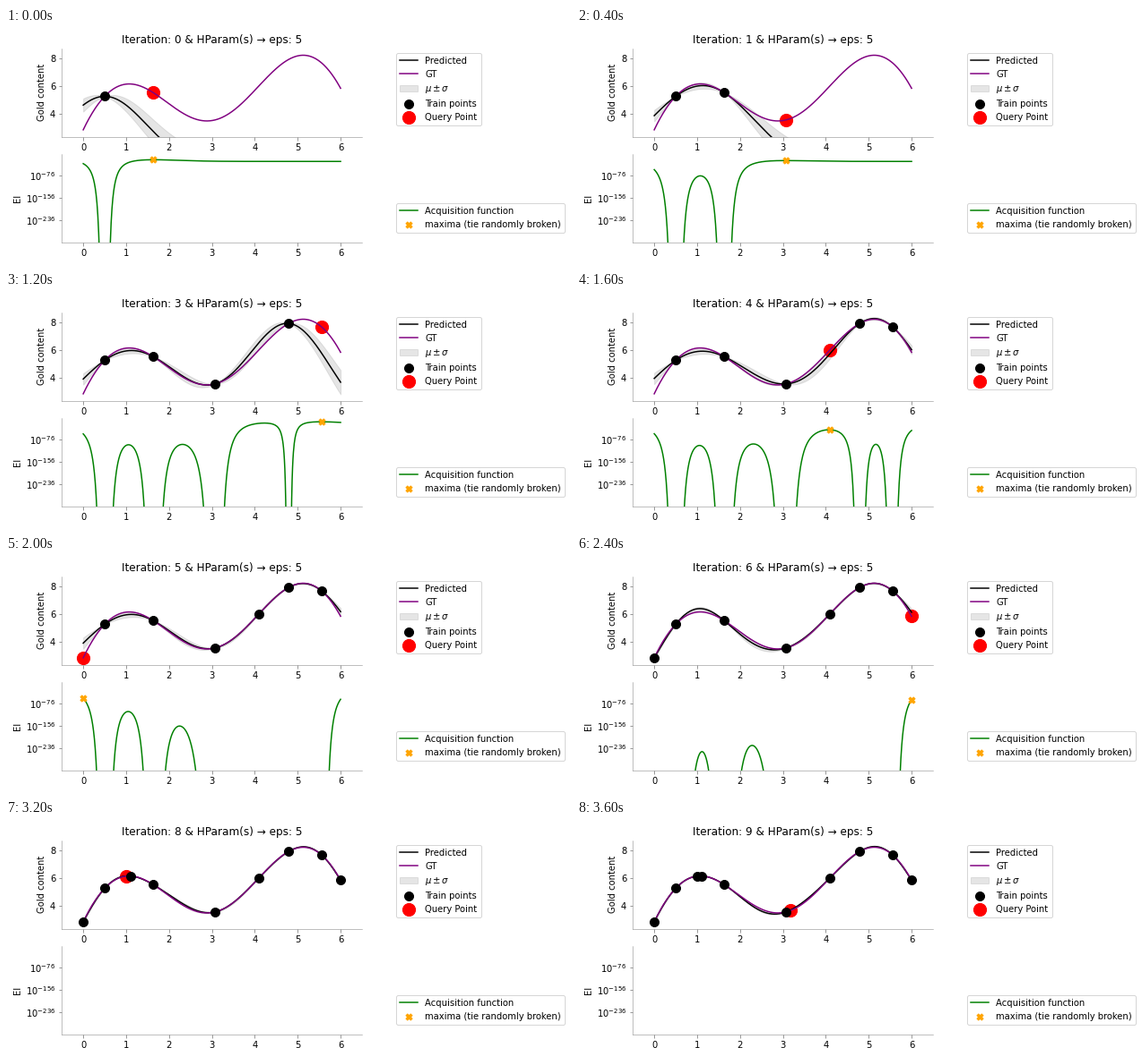
These frames come from a looping animation (630x264 px, 4 s). A matplotlib script:

```python
import numpy as np
import matplotlib.pyplot as plt
from matplotlib.animation import FuncAnimation

W, H, DPI = 630, 264, 72
EPS, SCALE = 5, 0.983
ITERS, STEP = 10, 400

plt.rcParams.update({"font.family": "DejaVu Sans", "font.size": 10})

# Smooth ground truth through a few known depths
KNOWN_X = [0, 0.5, 1.05, 1.64, 2.87, 3.08, 4.1, 4.79, 5.12, 5.55, 6]
KNOWN_Y = [2.82, 5.25, 6.15, 5.5, 3.46, 3.55, 6.01, 7.95, 8.21, 7.7, 5.83]
truth = np.poly1d(np.polyfit(KNOWN_X, KNOWN_Y, 8))

# First drill site, then the query chosen at each iteration
SITES = np.array([0.5, 1.635, 3.07, 4.79, 5.55, 4.1, 0, 6, 1.11, 1.01, 3.17])
xs = np.linspace(0, 6, 601)


def rbf(a, b):
    return np.exp(-0.5 * ((a[:, None] - b[None, :]) / SCALE) ** 2)


def posterior(x, train):
    k = rbf(train, x)
    w = np.linalg.solve(rbf(train, train) + 1e-10 * np.eye(len(train)), k)
    var = 1 - np.sum(k * w, axis=0)
    return w.T @ truth(train), np.sqrt(np.maximum(var, 1e-10))


def log_ei(mu, sd):
    """log10 of expected improvement, by its tail expansion."""
    z = (mu - truth(SITES[0]) - EPS) / sd
    q = 1 / z**2
    tail = q * (1 - 3 * q + 15 * q**2 - 105 * q**3)
    ln = np.log(sd) - z**2 / 2 - np.log(2 * np.pi) / 2 + np.log(tail)
    return np.maximum(ln / np.log(10), -1e4)


def add_axes(bottom, ylabel):
    ax = fig.add_axes([62.2 / W, bottom / H, 334.8 / W, 98.84 / H])
    for side in ("top", "right"):
        ax.spines[side].set_visible(False)
    for side in ("left", "bottom"):
        ax.spines[side].set(color="gray", linewidth=0.5)
    ax.tick_params(direction="out", color="gray")
    ax.set(xlim=(-0.5, 6.5), xticks=range(7), ylabel=ylabel)
    return ax


fig = plt.figure(figsize=(W / DPI, H / DPI), dpi=DPI, facecolor="white")
top = add_axes(142.4, "Gold content")
low = add_axes(23.8, "EI")

gt = truth(xs)
top.set(ylim=(gt.min() - 0.5, gt.max() + 0.5), yticks=[4, 6, 8])
pred, = top.plot([], [], "k", label="Predicted")
top.plot(xs, gt, "purple", label="GT")
band = top.fill_between(xs, gt, gt, color="gray", alpha=0.2,
                        label=r"$\mu \pm \sigma$")
train_pts = top.scatter([], [], s=100, c="black", zorder=10,
                        label="Train points")
query_pt = top.scatter([], [], s=200, c="red", label="Query Point")
top.legend(loc="upper left", bbox_to_anchor=(1.1, 1))

powers = [-76, -156, -236]
low.set_ylim(-316, 0)
low.set_yticks(powers, [rf"$\mathdefault{{10^{{{p}}}}}$" for p in powers])
acq, = low.plot([], [], "green", label="Acquisition function")
best_pt = low.scatter([], [], s=50, c="orange", marker="X", zorder=10,
                      label="maxima (tie randomly broken)")
low.legend(loc="upper left", bbox_to_anchor=(1.1, 0.5))


def update(i):
    train, query = SITES[:i + 1], SITES[i + 1]
    mu, sd = posterior(xs, train)
    ei = log_ei(mu, sd)
    pred.set_data(xs, mu)
    edge = np.concatenate([mu + sd, (mu - sd)[::-1]])
    band.set_verts([np.column_stack([np.concatenate([xs, xs[::-1]]), edge])])
    train_pts.set_offsets(np.column_stack([train, truth(train)]))
    query_pt.set_offsets([[query, truth(query)]])
    acq.set_data(xs, ei)
    best_pt.set_offsets([[query, np.interp(query, xs, ei)]])
    top.set_title(f"Iteration: {i} & HParam(s) \u2192 eps: {EPS}")
    return pred, band, train_pts, query_pt, acq, best_pt


anim = FuncAnimation(fig, update, frames=ITERS, init_func=lambda: update(0),
                     interval=STEP, repeat=True, repeat_delay=0)
plt.show()
```
